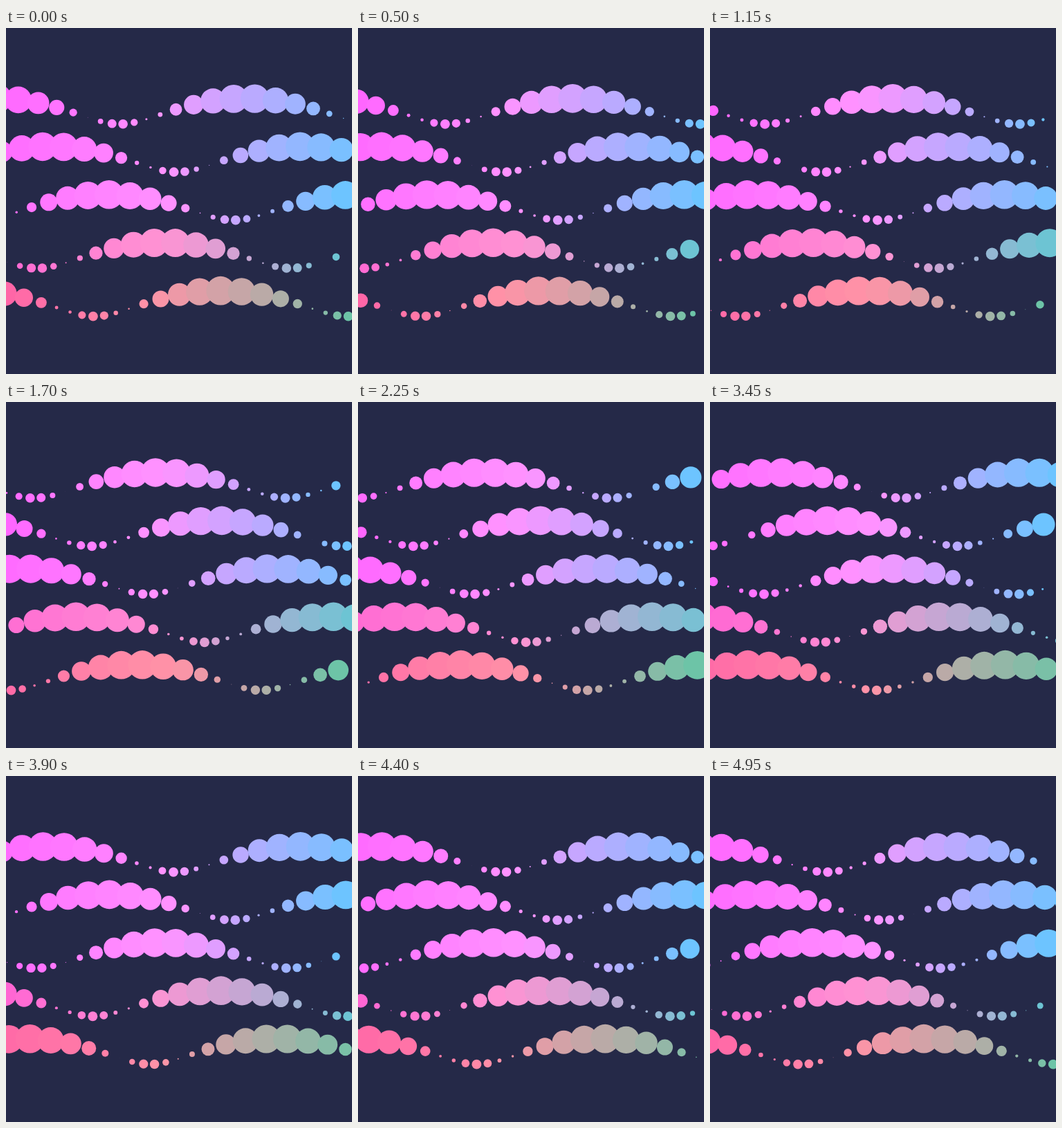
These frames come from a looping animation (500x500 px, 5 s). An HTML page with a canvas:

```html
<!DOCTYPE html>
<html lang="en">
<head>
<meta charset="utf-8">
<title>Dot waves</title>
<style>
  html, body { margin: 0; width: 100%; height: 100%; overflow: hidden; background: #252948; }
  canvas { display: block; }
</style>
</head>
<body>
<canvas id="stage" width="500" height="500"></canvas>
<script>
  const ctx = document.getElementById('stage').getContext('2d');
  const TAU = Math.PI * 2;
  const LOOP = 5000;
  const SIZE = 1080;          // design units across the stage
  const ORBIT = 40;           // radius of each dot's circular path
  const COL_PHASE = 0.3983;
  const ROW_PHASE = 0.225 * TAU;
  const START_PHASE = -1.098;

  const dots = [];
  for (let row = 0; row < 5; row++) {
    for (let col = -1; col <= 21; col++) {
      const x = 20 + 50 * col;
      const y = 260 + 150 * row;
      const red = Math.min(255, 382 - 0.255 * x);
      const green = 105 + 0.085 * x;
      const blue = Math.min(255, 255 - 44 * (row - 2));
      dots.push({
        x, y,
        phase: START_PHASE + COL_PHASE * col - ROW_PHASE * row,
        color: `rgb(${[red, green, blue].map(Math.round)})`
      });
    }
  }

  function draw(now) {
    const turn = (now % LOOP) / LOOP * TAU;
    const scale = 500 / SIZE;
    ctx.setTransform(1, 0, 0, 1, 0, 0);
    ctx.fillStyle = '#252948';
    ctx.fillRect(0, 0, 500, 500);
    ctx.scale(scale, scale);

    for (const { x, y, phase, color } of dots) {
      const a = phase + turn;
      // The signed radius crosses zero, so dots shrink away and regrow.
      const r = Math.abs(15 - 30 * Math.sin(a));
      ctx.fillStyle = color;
      ctx.beginPath();
      ctx.arc(x + ORBIT * Math.cos(a), y + ORBIT * Math.sin(a), r, 0, TAU);
      ctx.fill();
    }
  }

  let start;
  function tick(now) {
    start ??= now;
    draw(now - start);
    requestAnimationFrame(tick);
  }
  draw(0);
  requestAnimationFrame(tick);
</script>
</body>
</html>
```
